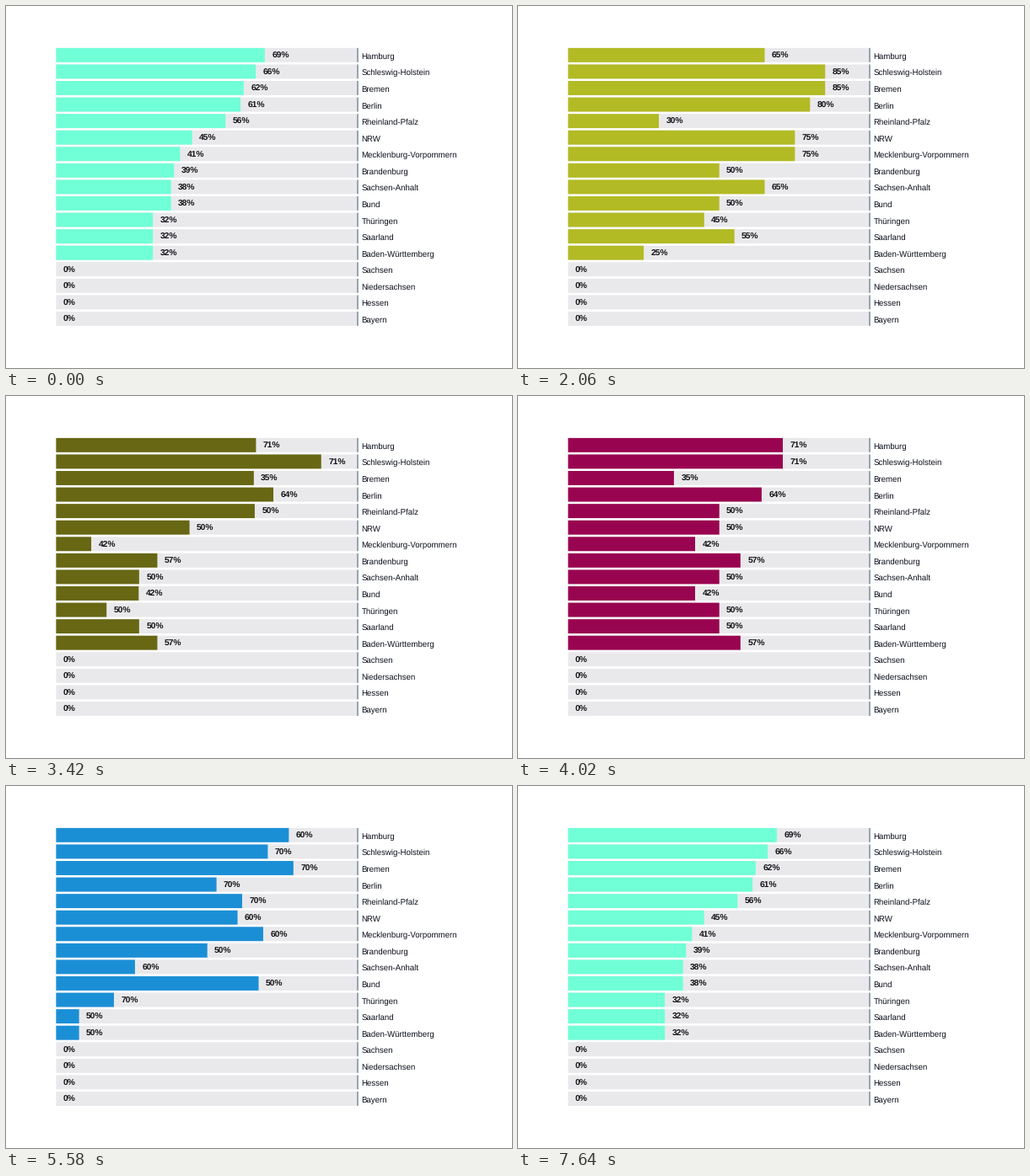
These frames come from a looping animation (600x430 px, 7660 ms). A matplotlib script:

```python
import matplotlib.pyplot as plt
import numpy as np
from matplotlib.animation import FuncAnimation
from matplotlib.collections import PolyCollection
from matplotlib.colors import to_rgb

plt.rcParams["text.hinting"] = "none"

W, H, DPI = 600, 430, 100
STEP, LOOP = 20, 7660                  # ms
FIRST, PERIOD, MOVE = 273, 1000, 740   # ms
X0, FULL = 59.4, 358.6
TOP, PITCH, BAR = 49.9, 19.57, 16.9

NAMES = ["Hamburg", "Schleswig-Holstein", "Bremen", "Berlin",
         "Rheinland-Pfalz", "NRW", "Mecklenburg-Vorpommern", "Brandenburg",
         "Sachsen-Anhalt", "Bund", "Thüringen", "Saarland",
         "Baden-Württemberg", "Sachsen", "Niedersachsen", "Hessen", "Bayern"]

# colour and percentages of each scene; missing rows are zero
SCENES = [
    ("#70ffd6", "69 66 62 61 56 45 41 39 38 38 32 32 32"),
    ("#ffe433", "71 32 46 39 64 10 17 17 17 17 17 14 28"),
    ("#b2ba24", "65 85 85 80 30 75 75 50 65 50 45 55 25"),
    ("#666913", "66 88 66 72 66 44 11 33 27 27 16 27 33"),
    ("#990450", "71 71 35 64 50 50 42 57 50 42 50 50 57"),
    ("#1f9de6", "80 70 80 50 60 60 70 50 20 70 10 0 0"),
    ("#03447a", "60 70 70 70 70 60 60 50 60 50 70 50 50"),
]
SCENES.append(SCENES[0])

colors = np.array([to_rgb(c) for c, _ in SCENES])
values = np.zeros((len(SCENES), len(NAMES)))
for row, (_, text) in zip(values, SCENES):
    nums = [int(v) for v in text.split()]
    row[:len(nums)] = nums

# strong symmetric ease: cubic bezier (a, 0, 1 - a, 1)
a = 0.93
u = np.linspace(0, 1, 400)
ease_x = 3 * a * u * (1 - u) ** 2 + 3 * (1 - a) * u ** 2 * (1 - u) + u ** 3
ease_y = 3 * u ** 2 - 2 * u ** 3


def ease(p):
    return np.interp(p, ease_x, ease_y)


tops = TOP + PITCH * np.arange(len(NAMES))


def boxes(left, right):
    rights = np.broadcast_to(right, tops.shape)
    return [[(left, y), (r, y), (r, y + BAR), (left, y + BAR)]
            for y, r in zip(tops, rights)]


def add_boxes(left, right, color):
    coll = PolyCollection(boxes(left, right), facecolors=color,
                          edgecolors="none", linewidths=0)
    coll.set_snap(False)
    ax.add_collection(coll, autolim=False)
    return coll


def add_text(x, y, text, px, weight, color):
    return ax.text(x, y, text, fontsize=px * 72 / DPI, weight=weight,
                   color=color, family="Liberation Sans", va="baseline")


fig = plt.figure(figsize=(W / DPI, H / DPI), dpi=DPI, facecolor="white")
ax = fig.add_axes([0, 0, 1, 1])
ax.set(xlim=(0, W), ylim=(H, 0))
ax.axis("off")

add_boxes(X0, 415.7, "#e9e9ec")
add_boxes(415.9, 418, "#98a5b0")
bars = add_boxes(X0, X0, SCENES[0][0])
for name, y in zip(NAMES, tops):
    add_text(421.6, y + 12.9, name, 9.68, "normal", "#0c101c")
labels = [add_text(X0, y + 12.2, "0%", 10.2, "bold", "#141418")
          for y in tops]


def draw(i):
    t = i * STEP - FIRST
    if t < 0:
        k = nxt = 0
        f = 0.0
    else:
        k = min(int(t // PERIOD), len(SCENES) - 2)
        nxt = k + 1
        f = ease(min((t - k * PERIOD) / MOVE, 1))
    ends = X0 + FULL / 100 * (values[k] + (values[nxt] - values[k]) * f)
    bars.set_verts(boxes(X0, ends))
    bars.set_facecolor(colors[k] + (colors[nxt] - colors[k]) * f)
    for label, x, v in zip(labels, ends, values[nxt]):
        label.set_x(x + 8.4)
        label.set_text(f"{v:.0f}%")
    return [bars, *labels]


anim = FuncAnimation(fig, draw, frames=LOOP // STEP, interval=STEP,
                     repeat=True, repeat_delay=0)
plt.show()
```
